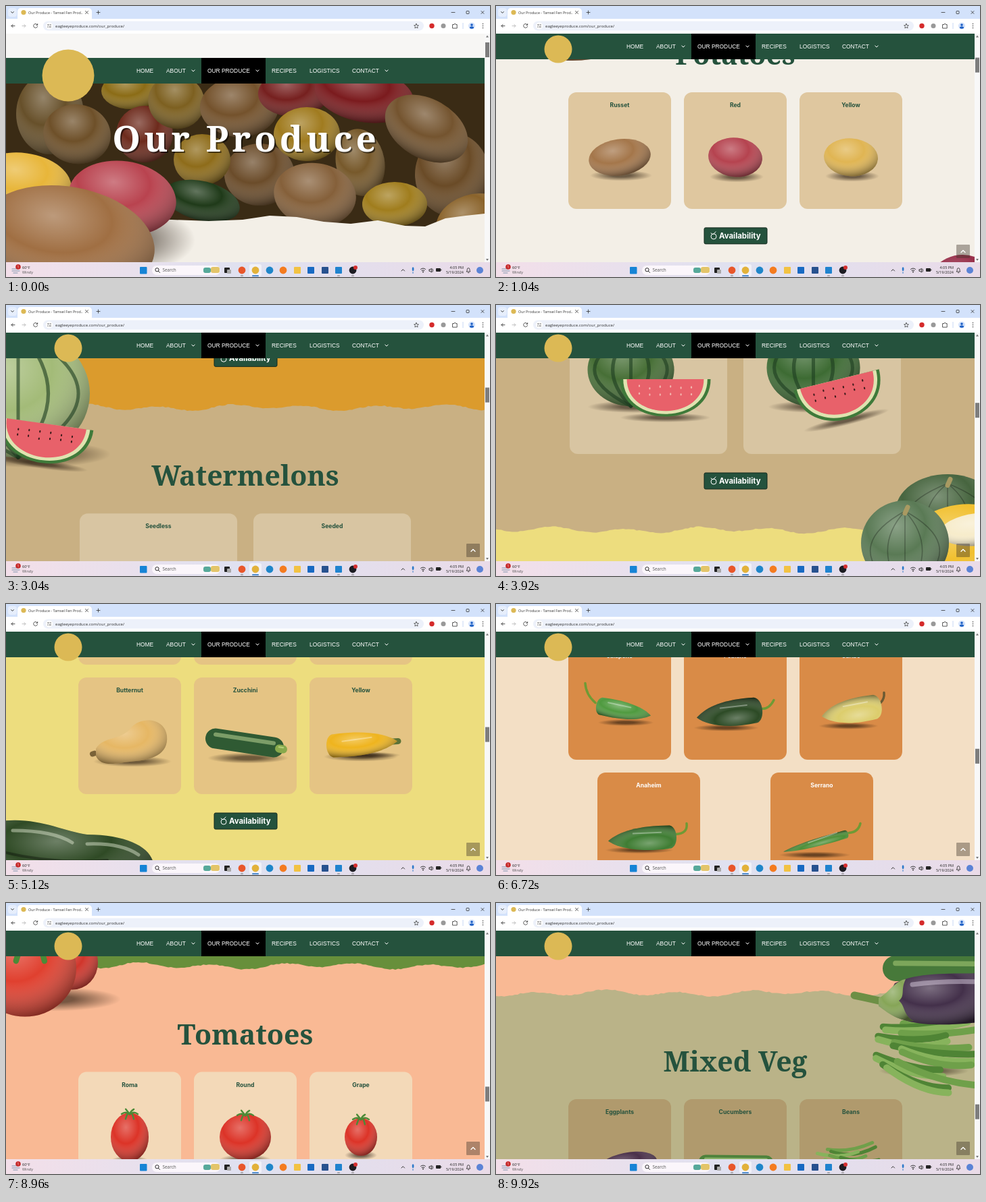
Recreate the animation shown at these times as an HTML page. Size 716 by 402 pixels, loop 10000 ms.

```html
<!DOCTYPE html>
<html lang="en">
<head>
<meta charset="utf-8">
<title>Our Produce</title>
<style>
html, body { margin: 0; width: 100%; height: 100%; overflow: hidden; background: #fff; }
svg { display: block; width: 100vw; height: 100vh; }
text { white-space: pre; }
.ui { font-family: "Open Sans", sans-serif; }
.nav { font-family: "Liberation Sans", Arial, sans-serif; }
.card { font-family: Inter, sans-serif; font-weight: 700; }
.slab { font-family: "Noto Serif", serif; font-weight: 700; }
</style>
</head>
<body>
<svg id="stage" viewBox="0 0 716 402"></svg>
<script>
const LOOP = 10000, STEP = 80;
const GREEN = '#25523d';

// ---- drawing helpers ----
let seed = 7;
const rand = () => (seed = seed * 16807 % 2147483647) / 2147483647;
const rect = (x, y, w, h, fill, r = 0, more = '') =>
  `<rect x="${x}" y="${y}" width="${w}" height="${h}" rx="${r}" fill="${fill}" ${more}/>`;
const oval = (x, y, rx, ry, fill) => `<ellipse cx="${x}" cy="${y}" rx="${rx}" ry="${ry}" fill="${fill}"/>`;
const dot = (x, y, r, fill) => oval(x, y, r, r, fill);
const line = (d, color, w = 1) =>
  `<path d="${d}" fill="none" stroke="${color}" stroke-width="${w}" stroke-linecap="round" stroke-linejoin="round"/>`;
const text = (cls, x, y, size, fill, s, more = '') =>
  `<text class="${cls}" x="${x}" y="${y}" font-size="${size}" fill="${fill}" ${more}>${s}</text>`;
const MID = 'text-anchor="middle"';
const at = (x, y, body, scale = 1, turn = 0) =>
  `<g transform="translate(${x} ${y}) rotate(${turn}) scale(${scale})">${body}</g>`;
const down = (x, y, s = 2.2, color = '#fff') => line(`M${x - s} ${y - s / 2}l${s} ${s}l${s} ${-s}`, color, 1);

// ---- produce ----
const drop = (x, y, rx, ry) => oval(x, y, rx, ry, 'url(#drop)');
const solid = (c, d) => `<path d="${d}" fill="${c}"/><path d="${d}" fill="url(#shade)"/>`;
const orb = (c, x, y, rx, ry, turn = 0) =>
  at(x, y, oval(0, 0, rx, ry, c) + oval(0, 0, rx, ry, 'url(#shade)'), 1, turn);
const rod = (c, lite, x1, y1, x2, y2, w) =>
  line(`M${x1} ${y1}L${x2} ${y2}`, c, w) +
  line(`M${x1} ${y1 - w / 5}L${x2} ${y2 - w / 5}`, lite, w / 5);

// tapered pod running from shoulder (x, y) to tip (tx, ty)
function pod(c, x, y, tx, ty, w, stem = '', stemColor = '#6f9a35') {
  const len = Math.hypot(tx - x, ty - y), turn = Math.atan2(ty - y, tx - x) * 180 / Math.PI;
  const d = `M0 ${-w}C${len * .5} ${-w * 1.2} ${len * .85} ${-w * .7} ${len} 0` +
    `C${len * .8} ${w * .8} ${len * .5} ${w * 1.15} 0 ${w}C${-w * .7} ${w * .8} ${-w * .7} ${-w * .8} 0 ${-w}Z`;
  return drop((x + tx) / 2, Math.max(y, ty) + w * .8, len * .55, 5) +
    (stem && line(stem, stemColor, 3.5)) + at(x, y, solid(c, d), 1, turn) +
    line(`M${x + (tx - x) * .15} ${y - w * .4}L${x + (tx - x) * .6} ${y + (ty - y) * .6 - w * .5}`, '#fff5', 2);
}
const onion = (c, tx, ty) => drop(2, 45, 38, 8) + solid(c,
  `M-36 12C-36 -8 ${tx - 14} -14 ${tx - 3} ${ty}L${tx + 3} ${ty}C${tx + 6} -16 37 -10 37 12C37 34 18 46 0 46S-36 34 -36 12Z`) +
  [-20, -7, 7, 20].map(x => line(`M${tx} ${ty + 10}Q${x * 1.8} 12 ${x * .4} 44`, '#fff2', .8)).join('');
const bell = (c, bend = 3) => drop(2, 54, 34, 8) + solid(c,
  'M-30 8C-32 -12 -12 -10 0 -6C14 -12 32 -10 29 10C29 30 25 50 16 54C9 58 5 54 0 53C-6 59 -14 57 -19 52C-27 42 -30 24 -30 8Z') +
  line('M-11 0Q-15 26 -9 48M11 0Q16 24 9 48', '#0002', 2) + line('M-18 6Q-21 18 -18 30', '#fff8', 3) +
  line(`M0 -5Q-1 -20 ${bend} -33`, '#6f9a35', 7) + line('M-9 -5Q0 -9 10 -5', '#527d2b', 4);
const tomato = (rx, ry) => drop(0, ry + 9, rx, 7) + orb('#dc3327', 0, 10, rx, ry) + leaves(0, 12 - ry, 12);
const leaves = (x, y, r) => [0, 1, 2, 3, 4, 5].map(i =>
  line(`M${x} ${y}Q${x + Math.cos(i) * r * .5} ${y - r * .4} ${x + Math.cos(i * 1.05) * r} ${y + Math.sin(i * 1.05) * r * .7}`,
    '#4b8a37', r / 5)).join('');
const spud = (c, rx, ry, turn) => drop(2, 10 + ry, rx, 8) + orb(c, 0, 10, rx, ry, turn);
const ribbed = (c, x, y, rx, ry) => orb(c, x, y, rx, ry) + [-.7, -.35, 0, .35, .7].map(k =>
  line(`M${x} ${y - ry * .75}Q${x + k * rx * 1.9} ${y} ${x + k * rx * .6} ${y + ry * .88}`, '#0004', 1.6)).join('') +
  line(`M${x} ${y - ry * .7}l4 -9`, '#a99a62', 7);
const striped = (x, y, rx, ry, c = '#476f36') => orb(c, x, y, rx, ry) + [-.8, -.4, 0, .4, .8].map(k =>
  line(`M${x} ${y - ry}Q${x + k * rx * 2.1} ${y} ${x} ${y + ry}`, '#1d3d2099', 5)).join('');
function slice(x, y, half, depth, turn, pips) {
  const arc = k => `M${-half * k} 0C${-half * k} ${depth * 1.3 * k} ${half * k} ${depth * 1.3 * k} ${half * k} 0Z`;
  let s = drop(0, depth, half, 7);
  [['#3f7a3a', 1], ['#dfe3b0', .93], ['#e8616a', .85]].forEach(([c, k]) => s += `<path d="${arc(k)}" fill="${c}"/>`);
  for (let i = 0; i < 12; i++)
    s += oval((i % 6 - 2.5) * half * .23, 10 + (i > 5) * 10 + rand() * 4, 1.1, 1.8, pips);
  return at(x, y, s, 1, turn);
}
function beans(n, x, y, w, h, len, size) {
  let s = drop(x + w / 2 + len * .2, y + h, w * .7, 9);
  for (let i = 0; i < n; i++) {
    const bx = x + rand() * w * .45, by = y + h * i / n;
    s += at(bx, by, line(`M0 0Q${len / 2} ${9 + rand() * 10} ${len * (.8 + rand() * .3)} 4`,
      ['#6fa04a', '#4f8435', '#87b35c'][i % 3], size), 1, -12 + i / n * 34);
  }
  return s;
}
const eggplant = drop(8, 32, 55, 8) + orb('#4a304a', 10, 13, 46, 20, -12) +
  line('M-50 22L-38 20', '#71924b', 6) + orb('#71924b', -32, 19, 9, 13);
const butternut = drop(4, 38, 58, 8) + line('M-52 26l-3 1', '#7a6238', 8) +
  solid('#e6b764', 'M-50 19C-38 0 -14 8 2 -12C18 -30 52 -26 55 0C58 28 32 36 4 38C-18 40 -42 48 -50 30Z');

// ---- page content ----
const sections = [
  { name: 'Potatoes', bg: '#f3efe7', card: '#dfc79f', ink: GREEN, head: GREEN, items: [
    ['Russet', spud('#a4764a', 46, 27, -8)], ['Red', spud('#b5434f', 40, 29, 6)], ['Yellow', spud('#e0b553', 40, 28, 4)]],
    decor: drop(165, 30, 115, 52) + orb('#e8b63a', 25, -55, 72, 44, 8) + orb('#b9434f', 172, -32, 80, 55, 8) +
      orb('#a06f43', 90, 30, 131, 79, 10) },
  { name: 'Onions', bg: '#db9b2d', card: '#e8c68a', ink: GREEN, head: '#f6efe0', items: [
    ['Yellow Onions', onion('#d39547', -20, -27)], ['Red Onions', onion('#a3324e', 18, -35)], ['White Onions', onion('#e9e7da', -19, -30)]],
    decor: drop(500, 82, 55, 20) + drop(600, 112, 85, 20) + drop(690, 88, 55, 16) + orb('#ecebe0', 495, 35, 47, 53) +
      orb('#98304b', 690, 25, 60, 69) + orb('#d9974c', 583, 46, 78, 72) +
      [-50, -25, 0, 25, 50].map(x => line(`M583 -25Q${583 + x * 1.9} 40 ${583 + x * .4} 116`, '#fff2', 1.2)).join('') },
  { name: 'Watermelons', bg: '#c9b083', card: '#d8c5a2', ink: GREEN, head: GREEN, big: true, items: [
    ['Seedless', drop(-20, 60, 70, 9) + striped(-26, 5, 64, 54) + slice(25, 19, 67, 57, 0, '#f3b8b0')],
    ['Seeded', drop(-10, 60, 70, 9) + striped(-13, 2, 69, 58, '#3d6b33') + slice(21, 20, 65, 62, -14, '#3a1a1a')]],
    decor: drop(40, 70, 115, 20) + striped(18, -20, 106, 95, '#a3bb78') + slice(60, 25, 70, 60, 8, '#3a1a1a') },
  { name: 'Squash', bg: '#eddd7e', card: '#e5c484', ink: GREEN, head: GREEN, items: [
    ['Acorn', drop(0, 46, 44, 8) + ribbed('#476646', 0, 10, 40, 38)], ['Kabocha', drop(0, 46, 48, 8) + ribbed('#52704a', 0, 12, 46, 34)],
    ['Spaghetti', spud('#edc94f', 52, 30, -4)], ['Butternut', butternut],
    ['Zucchini', drop(4, 33, 60, 8) + rod('#2f5a33', '#7c9d68', -44, 4, 42, 17, 30) + rod('#88a94c', '#b5cf79', 50, 19, 56, 20, 12)],
    ['Yellow', drop(0, 31, 55, 7) + line('M40 9L55 8', '#5b7237', 9) + pod('#efb41e', -42, 15, 54, 8, 17)]],
    decor: ribbed('#47653f', 668, -27, 77, 55) + orb('#f1c02f', 690, 25, 90, 62, -8) + orb('#f7eccb', 712, 0, 55, 24, -6) +
      ribbed('#5a7a55', 605, 20, 65, 63) },
  { name: 'Chili Peppers', bg: '#f3dfc5', card: '#d98b47', ink: '#fff', head: GREEN, items: [
    ['Jalapeño', pod('#4f9a3f', -28, 7, 46, 21, 13, 'M-36 2Q-50 -10 -51 -27')],
    ['Poblano', pod('#2c4a25', 30, 13, -57, 24, 19, 'M38 11Q50 12 57 -2')],
    ['Caribe', pod('#dccd6c', 36, 8, -43, 22, 18, 'M44 2Q50 -4 49 -13', '#6b5a33')],
    ['Anaheim', pod('#3f7d33', 32, 9, -60, 15, 17, 'M40 5Q58 4 56 -11')],
    ['Serrano', pod('#4d8f38', 36, 5, -57, 31, 6, 'M40 3Q54 2 57 -11')]],
    decor: drop(95, 34, 125, 22) + solid('#2f4a25', 'M-20 -70C40 -82 80 -58 120 -52C190 -52 225 -25 217 2C205 40 60 32 -20 25Z') +
      line('M10 -58Q70 -58 98 -40M120 -38Q170 -40 196 -22', '#dfe8d177', 5) + line('M0 -25Q70 -8 150 -14', '#0005', 4) +
      pod('#4f9a3f', 20, 45, 140, 60, 20) },
  { name: 'Bell Peppers', bg: '#678f3b', card: '#f7c6d0', ink: GREEN, head: '#f7dfe2', items: [
    ['Red', bell('#d42a25')], ['Green', bell('#4f8f36')], ['Yellow', bell('#f2ab17', -28)]],
    decor: at(600, 15, bell('#d42a25'), 1.7) + at(667, 72, bell('#f3ac18'), 2.05) },
  { name: 'Tomatoes', bg: '#f9b994', card: '#f3d9b8', ink: GREEN, head: GREEN, items: [
    ['Roma', tomato(28, 36)], ['Round', tomato(38, 34)], ['Grape', tomato(24, 28)]],
    decor: drop(70, 50, 100, 18) + orb('#cf3a2c', 60, -60, 42, 49) + leaves(62, -104, 28) + orb('#d0352b', 98, -4, 38, 40) +
      orb('#e0402f', 28, 4, 76, 72) + leaves(36, -32, 42) },
  { name: 'Mixed Veg', bg: '#bab388', card: '#b09a6d', ink: GREEN, head: GREEN, items: [
    ['Eggplants', eggplant], ['Cucumbers', drop(0, 18, 60, 7) + rod('#4e823c', '#8bb26a', -44, 6, 46, 7, 20)],
    ['Beans', beans(12, -52, -12, 90, 36, 62, 5)]],
    decor: rod('#47793a', '#7da65b', 591, -36, 730, -35, 38) + beans(15, 562, 46, 95, 70, 118, 10) +
      solid('#43304a', 'M590 -14C630 -34 690 -26 730 -30V42C680 48 625 52 592 36C580 18 580 2 590 -14Z') +
      line('M616 -12Q660 -18 716 -16', '#cfc2d588', 7) + line('M530 4Q550 8 575 14', '#6d8f45', 11) +
      solid('#86a557', 'M566 8C580 2 590 -18 606 -20C598 -4 606 4 596 12C606 20 602 34 618 42C592 42 578 28 566 20Z') }
];

const heroTear = [0, 318, 245, 317, 300, 319, 350, 317, 390, 311, 430, 313, 470, 320, 510, 323, 550, 318, 590, 326,
  620, 327, 650, 315, 680, 311, 708, 308];
function tear(y, k) {
  let d = '';
  if (k) for (let x = 0; x <= 708; x += 4)
    d += `${x} ${(y + 3.3 * Math.sin(x / 17 + k * 2) + 2 * Math.sin(x / 41 + k) + rand() * 1.6).toFixed(1)} `;
  else d = heroTear.join(' ');
  return d;
}

function availability(y) {
  return rect(308, y, 93, 24, GREEN, 2, 'stroke="#13281d"') +
    `<circle cx="322" cy="${y + 13}" r="4" fill="none" stroke="#fff"/>` + line(`M318 ${y + 8}l3 2l4 -4`, '#fff') +
    text('card', 330, y + 16, 11.4, '#fff', 'Availability');
}

function buildPage() {
  let page = '', decor = '', y = 317;
  sections.forEach((s, k) => {
    const w = s.big ? 233 : 152, h = s.big ? 260 : 173, rows = Math.ceil(s.items.length / 3);
    page += `<path d="M${tear(y, k)}L708 ${y + 800}H0Z" fill="${s.bg}"/>` +
      text('slab', 354, y + 117, 41, s.head, s.name, MID);
    s.items.forEach(([name, art], i) => {
      const row = Math.floor(i / 3), pair = s.items.length - row * 3 === 2, col = i % 3;
      const x = s.big ? 109 + 257 * col : pair ? 150 + 256 * col : 107 + 171 * col;
      const top = y + 158 + row * 192;
      page += rect(x, top, w, h, s.card, 12) + text('card', x + w / 2, top + 22, 8.6, s.ink, name, MID) +
        at(x + w / 2, top + h / 2, art);
    });
    const end = y + 158 + h + (rows - 1) * 192;
    page += availability(end + 28);
    decor += at(0, y, s.decor);
    y = end + 112;
  });
  return page + decor;
}

// colour, x, y, rx, ry, turn
const heap = [
  ['#67502a', 65, 160, 50, 60, 0], ['#6e5029', 105, 190, 50, 44, 10], ['#8b6c16', 185, 126, 44, 27, 0],
  ['#6d2a1c', 205, 190, 42, 42, 0], ['#7d6020', 252, 142, 42, 40, 20], ['#6b4c2a', 375, 250, 52, 46, 0],
  ['#74522c', 345, 150, 58, 44, 0], ['#76201f', 425, 130, 52, 34, 0], ['#7b1b1e', 530, 132, 74, 40, 10],
  ['#8e6c1a', 290, 228, 42, 38, 0], ['#6a4b27', 660, 250, 55, 62, 0], ['#74542f', 622, 182, 66, 44, 30],
  ['#77592b', 524, 232, 36, 50, -10], ['#a07b1f', 445, 190, 49, 40, 0], ['#85603a', 457, 280, 61, 47, 8],
  ['#a07d1d', 575, 294, 48, 33, 0], ['#8a632b', 690, 318, 55, 38, -18], ['#1f3a19', 290, 289, 57, 29, 14]
];
const hero = rect(0, 41, 708, 40, '#f7f6f4') + rect(0, 114, 708, 230, '#3a2b15') +
  heap.map(a => orb(...a)).join('') +
  text('slab', 357, 218, 53, '#0008', 'Our Produce', MID + ' letter-spacing="5"') +
  text('slab', 355, 216, 53, '#fff', 'Our Produce', MID + ' letter-spacing="5"');

const nav = rect(0, -19, 708, 38, GREEN) + rect(289, -19, 95, 38, '#000') +
  [['HOME', 193], ['ABOUT', 237], ['OUR PRODUCE', 298], ['RECIPES', 393], ['LOGISTICS', 449], ['CONTACT', 512]]
    .map(([s, x]) => text('nav', x, 3, 8.4, '#fff', s)).join('') + [277, 372, 563].map(x => down(x, 0)).join('');

const browser = rect(0, 0, 716, 20, '#d3e2fb') + rect(3, 3, 13, 13, '#e6eefc', 4) + down(9.5, 9.5, 1.8, '#333') +
  rect(17, 3, 110, 20, '#fff', 5) + dot(26, 9.5, 3.6, '#dcb955') +
  text('ui', 33, 11.6, 5.4, '#333', 'Our Produce - Tamsel Fen Prod..') +
  line('M117.5 7.5l4 4m0 -4l-4 4M134 9.5h5m-2.5 -2.5v5M659 9.5h5M703 7.5l4 4m0 -4l-4 4', '#333', .8) +
  rect(681, 7.5, 4, 4, 'none', .5, 'stroke="#333" stroke-width=".8"') +
  rect(0, 19, 716, 22, '#fff') + rect(55, 22.5, 563, 14, '#edf1fa', 7) + dot(64, 29.5, 5, '#fff') +
  line('M13 29.5h-5m2.3 -2.3l-2.3 2.3l2.3 2.3M46.4 28a3 3 0 1 0 .2 2.4M46.7 26.5v1.8h-1.8M61.5 28h2m1.6 0h1.4M61.5 31h.6m1.8 0h2.6', '#444', .9) +
  line('M24 29.5h5m-2.3 -2.3l2.3 2.3l-2.3 2.3', '#bbb', .9) +
  text('ui', 73, 31.7, 6.05, '#333', 'eagleeyeproduce.com/our_produce/') +
  line('M607 26.3l1 2.2l2.4 .3l-1.8 1.6l.5 2.4l-2.1 -1.2l-2.1 1.2l.5 -2.4l-1.8 -1.6l2.4 -.3z', '#444', .8) +
  dot(630, 29.5, 3.7, '#d52b2b') + dot(647, 29.5, 3.5, '#999') +
  line('M661 27.5h2a1.2 1.2 0 0 1 2.4 0h1.8v5.5h-6.2z', '#444', .9) + rect(675.5, 25, 1, 9, '#c8d8f5') +
  dot(689, 29.5, 5, '#d3e2fb') + dot(689, 28, 1.8, '#1c5fc4') + oval(689, 32, 3, 1.7, '#1c5fc4') +
  [26.5, 29.5, 32.5].map(y => dot(705.5, y, .8, '#444')).join('');

const apps = [['#e8562a', 349], ['#e2b23a', 369], ['#1f86c9', 390], ['#f47b20', 410], ['#f2c243', 431, 1],
  ['#1769c2', 451, 1], ['#27518f', 472, 1], ['#1f83cf', 492, 1], ['#1c1c22', 513]];
const taskbar = rect(0, 380, 716, 22, 'url(#bar)') + line('M9 390h8m-8 3h11m-9 3h6', '#7d93ac', 1.2) +
  dot(18, 387, 3.8, '#c62828') + text('ui', 18, 389, 5, '#fff', '1', MID) +
  text('ui', 24, 390, 5.5, '#222', '60°F') + text('ui', 24, 397.3, 5.5, '#555', 'Windy') +
  rect(198, 387, 10.5, 10.5, '#1684d6', 1) + rect(216, 385, 101, 14, '#fbf6fb', 7) +
  `<circle cx="223.5" cy="391.3" r="2.6" fill="none" stroke="#222"/>` + line('M225.5 393.4l2 2', '#222') +
  text('ui', 231.5, 394.3, 6.4, '#555', 'Search') +
  rect(292, 388, 11, 8, '#57a99a', 3) + rect(303, 387, 13, 9, '#e3c56a', 3) +
  rect(323, 388, 8, 8, '#222', 1) + rect(327, 391, 6, 6, '#aaa', 1) + rect(360, 383, 18, 18, '#fff8', 3) +
  apps.map(([c, x, sq]) => sq ? rect(x - 5, 387, 10, 10, c, 1) : dot(x, 392, 5.4, c)).join('') + dot(517, 388, 3, '#d32f2f') +
  [349, 492, 513].map(x => rect(x - 2, 399.5, 4, 1.2, '#888', .6)).join('') + rect(364, 399.5, 10, 1.4, '#1b6dc1', .7) +
  line('M585 393l2.3 -2.3l2.3 2.3M613.5 390.5q3.5 -3 7 0M615 392.5q2 -1.6 4 0M626 391v2.4h1.3l2 1.6v-5.6l-2 1.6zM631 390q1.5 2.2 0 4.4', '#222', .9) +
  rect(600.8, 387.5, 2.6, 5.5, '#2b79c9', 1.3) + line('M602 394.5v2', '#2b79c9', .9) + dot(617, 394.5, .9, '#222') +
  rect(636, 389, 7, 5, '#222', 1) + rect(643.3, 390.5, 1, 2, '#222') +
  text('ui', 677, 389.8, 5.5, '#222', '4:05 PM', 'text-anchor="end"') +
  text('ui', 677, 397.2, 5.5, '#222', '5/19/2024', 'text-anchor="end"') +
  line('M681.5 394h5.4q-1 -1 -1 -3.5a1.8 1.8 0 0 0 -3.6 0q0 2.5 -.8 3.5M683.5 395.7h1.4', '#222', .8) + dot(701, 392, 5, '#5b83d6');

const stage = document.getElementById('stage');
stage.innerHTML = `<defs>
  <radialGradient id="shade" cx=".4" cy=".3" r=".75"><stop offset="0" stop-color="#fff" stop-opacity=".3"/>
    <stop offset=".45" stop-color="#fff" stop-opacity="0"/><stop offset="1" stop-color="#000" stop-opacity=".5"/></radialGradient>
  <radialGradient id="drop"><stop offset=".3" stop-color="#20140a" stop-opacity=".6"/><stop offset="1" stop-color="#20140a" stop-opacity="0"/></radialGradient>
  <linearGradient id="bar"><stop offset="0" stop-color="#f3dfe9"/><stop offset=".5" stop-color="#dfe1f0"/><stop offset="1" stop-color="#eadbe8"/></linearGradient>
  <clipPath id="view"><path d="M0 41H708V380H0Z"/></clipPath></defs>
  <g clip-path="url(#view)"><g id="page">${hero}${buildPage()}</g>
    <g id="nav">${nav}</g><circle id="badge" cx="92" fill="#dcb955"/>
    <g id="up">${rect(681, 354, 20, 20, '#3c322866', 1)}${line('M688 365.5l3 -3l3 3', '#fff', 1.4)}</g></g>
  ${rect(708, 41, 8, 339, '#f8f8f8')}<path d="M710 46.5l2 -3l2 3zM710 375l2 3l2 -3z" fill="#777"/>
  <rect id="thumb" x="709" width="6" height="22" fill="#7d7d7d"/>${browser}${taskbar}`;

// ---- motion ----
const stops = [[0, 0], [2160, 731], [3920, 1400], [5120, 1974], [6720, 2468], [8240, 3057], [9920, 3756]];
const slope = i => {
  const a = stops[Math.max(i - 1, 0)], b = stops[Math.min(i + 1, stops.length - 1)];
  return (b[1] - a[1]) / (b[0] - a[0]);
};
function scrollAt(t) {
  let i = 0;
  while (i < stops.length - 2 && t >= stops[i + 1][0]) i++;
  const [t0, y0] = stops[i], [t1, y1] = stops[i + 1], d = t1 - t0, u = (t - t0) / d, v = 1 - u;
  return v * v * (1 + 2 * u) * y0 + u * u * (3 - 2 * u) * y1 + d * u * v * (v * slope(i) - u * slope(i + 1));
}
const clamp = v => Math.min(1, Math.max(0, v));
const part = id => document.getElementById(id);
const [page, bar, badge, up, thumb] = ['page', 'nav', 'badge', 'up', 'thumb'].map(part);

function draw(now) {
  const t = Math.floor(now % LOOP / STEP) * STEP, y = scrollAt(t);
  const mid = Math.max(60, 96 - y), shrink = clamp((y - 36) / 90);
  page.setAttribute('transform', `translate(0 ${-y.toFixed(2)})`);
  bar.setAttribute('transform', `translate(0 ${mid})`);
  badge.setAttribute('cy', mid + 7 - 3 * shrink);
  badge.setAttribute('r', 38.5 - 18 * shrink);
  up.setAttribute('opacity', clamp((y - 100) / 80));
  thumb.setAttribute('y', 54 + y / 15.35);
}
const start = performance.now();
function tick() {
  draw(performance.now() - start);
  requestAnimationFrame(tick);
}
tick();
</script>
</body>
</html>
```
